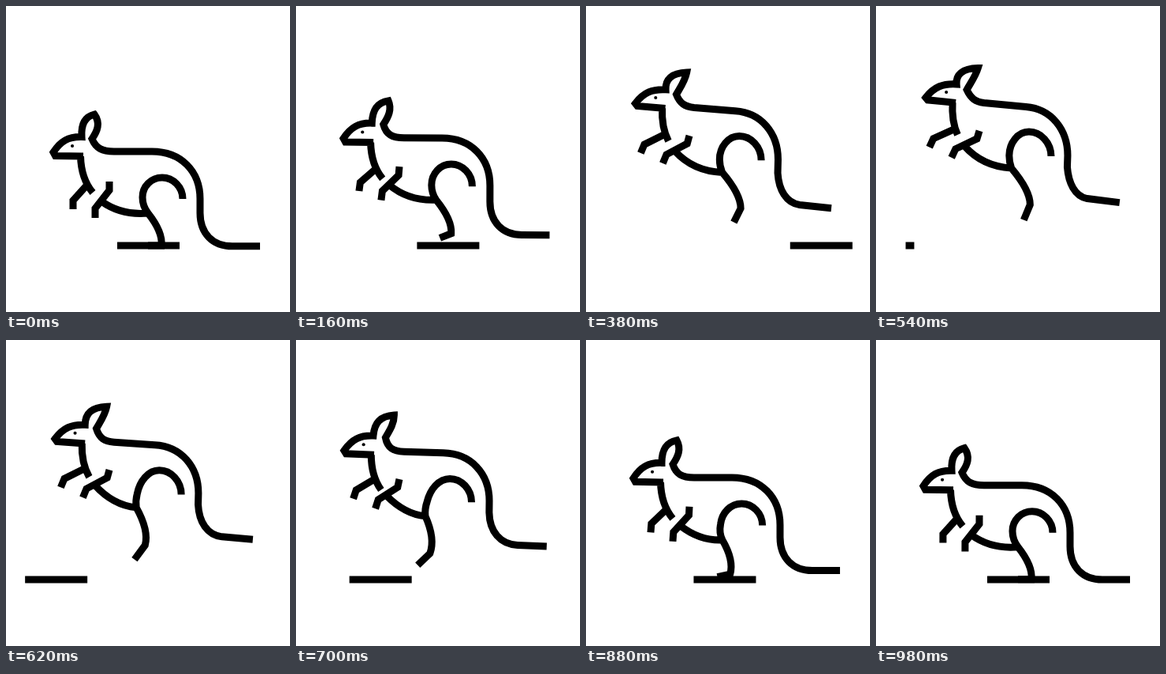
These frames come from a looping animation (360x387 px, 1 s). An HTML page:

```html
<!DOCTYPE html>
<html lang="en">
<head>
<meta charset="utf-8">
<title>Hopping kangaroo</title>
<style>
  html, body { margin: 0; width: 100%; height: 100%; overflow: hidden; background: #fff; }
  svg { display: block; width: 100%; height: 100%; }
  path { fill: none; stroke: #000; stroke-width: 9; stroke-miterlimit: 6; }
  #eye { stroke-width: 4; stroke-linecap: round; }
</style>
</head>
<body>
<svg viewBox="0 0 360 387">
  <path id="ground"/>
  <path id="body"/>
  <path id="eye"/>
</svg>
<script>
const LOOP = 1000;
const RISE = 57;  // height of the hop

// Each part as [crouched, airborne]. Head to tail is one line.
const HEAD = [
  'M98 190L62.5 189.5L60 185C69 171 79 165 96 165.5',
  'M101 123.5L65.5 120L63 117C74 103 85 99 102 100'];
const EAR = [
  'C95 150 100 140 112 137C120 148 116 158 109 168',
  'C101 88 109 80 129 79.5C126 90 120 98 115 107'];
const BACK = [
  'C114 180 122 184 137 184L185 184C222 184 246 209 246 244',
  'C120 118 126 122 137 123.5L190 128.5C222 131 243 157 243 190'];
const TAIL = [
  'L246 262C246 288 262 304 287 304L322 304',
  'L242.5 205C244 225 252 242 268 245L309 250'];
const THROAT = ['M94.5 190C95 210 100 224 110 236', 'M97 123C96 140 98 152 103.5 164'];
const ARMS = [
  'M103 226L85 246L85 257M131 222L131 233L113 256L113 268',
  'M99 157L73 169L68 180M131 159L128 169L101 182L96 193'];
const BELLY = ['M121 247Q146 265 ', 'M112 178Q135 204 '];
const KNEE = ['180 262', '172 206'];
const THIGH = ['M224 244C224 229 212 217 198 217', 'M222 191C222 174 209 160 194 160'];
const HIP = ['C184 217 173 228 173 242Q173 253 ', 'C180 160 169 174 169 190Q169 198 '];
const SHIN = ['Q199 286 197 303L180 303', 'Q196 234 196 252L188 271'];
const EYE = ['M84 177L84.1 177', 'M89 110L89.1 110'];

const smooth = x => {
  x = Math.min(1, Math.max(0, x));
  return x * x * (3 - 2 * x);
};

function lift(t) {
  const s = Math.abs(Math.sin(Math.PI * t / LOOP));
  return s * s * (1.5 - .47 * s);
}

// Change shape by `shape` while rising by `up`, then move each point by `warp`
function blend([from, to], shape, up, warp = (x, y) => [x, y]) {
  const end = to.match(/[\d.]+/g);
  const mix = (a, b) => +a + (b - a) * shape;
  let i = 0;
  return from.replace(/([\d.]+) ([\d.]+)/g, (_, x, y) =>
    warp(mix(x, end[i++]), mix(y, end[i++]) - RISE * (up - shape))
      .map(n => n.toFixed(2)).join(' '));
}

function bar(t) {
  const u = t < LOOP / 2 ? t : t - LOOP, away = Math.abs(u);
  const mid = 180.5 + Math.sign(u) * 137.5 * smooth(away / 460) ** 1.9;
  const half = 39.5 * smooth((480 - away) / 90);
  return half ? `M${mid - half} 303H${mid + half}` : '';
}

function draw(t) {
  const up = lift(t), tilt = lift(t + 15) ** 3;
  const fall = Math.max(0, (t - 540) / 440);
  const reach = fall < 1 ? Math.sin(Math.PI * fall ** .8) : 0;

  // Before landing the leg swings forward, more towards the foot
  const swing = (x, y) => {
    const depth = reach * Math.max(0, y - 234 + 56 * up);
    return [x - .37 * depth, y + .06 * depth];
  };
  const body = part => blend(part, tilt, up);
  const limb = part => blend(part, up, up);
  const leg = part => blend(part, up, up, swing);
  const set = (id, d) => document.getElementById(id).setAttribute('d', d);

  set('body', body(HEAD) + limb(EAR) + body(BACK) + blend(TAIL, tilt, lift(t - 15)) +
    body(THROAT) + limb(ARMS) + limb(BELLY) + leg(KNEE) +
    limb(THIGH) + leg(HIP) + leg(KNEE) + leg(SHIN));
  set('eye', body(EYE));
  set('ground', bar(t));
}

const start = performance.now();
function tick() {
  draw((performance.now() - start) % LOOP);
  requestAnimationFrame(tick);
}
tick();
</script>
</body>
</html>
```
